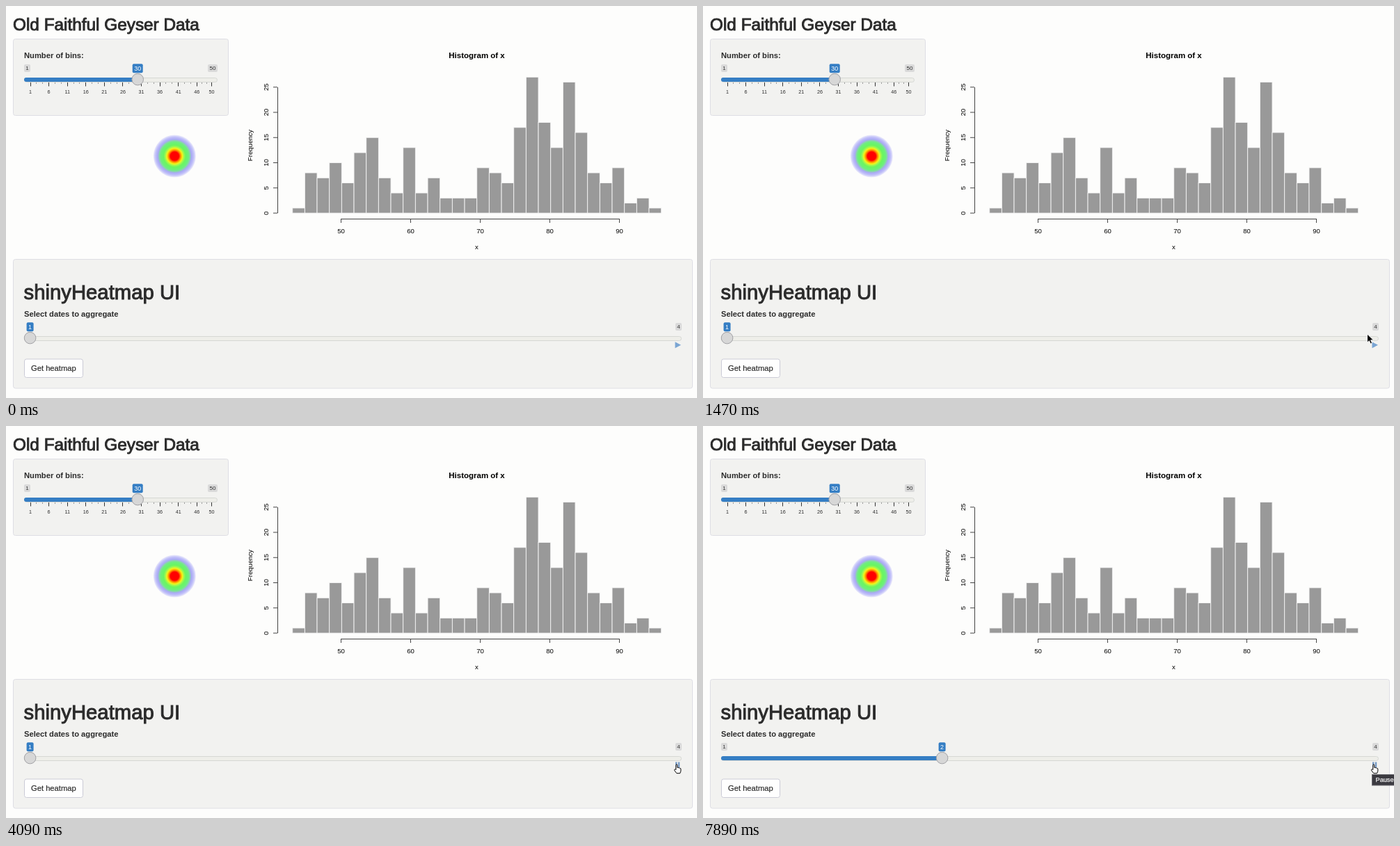
These frames come from a looping animation (993x564 px, 8000 ms). An HTML page:

```html
<!DOCTYPE html>
<html lang="en">
<head>
<meta charset="utf-8">
<title>Heatmap demo</title>
<style>
  html, body { margin: 0; width: 100%; height: 100%; overflow: hidden; background: #fdfdfc; }
  svg { display: block; width: 993px; height: 564px; font-family: "Liberation Sans", Arial, sans-serif; fill: #2b2b2b; }
  .well { fill: #f2f2f0; stroke: #dedee4; }
  .medium { stroke: #2b2b2b; stroke-width: .95; }
  .bold { font-weight: bold; font-size: 11.2px; }
  .mid { text-anchor: middle; }
  .track { fill: #eeeee9; stroke: #d6d8d4; }
  .blue { fill: #357ec4; }
  .knob { fill: #d7d7d7; stroke: #a0a0a4; }
  .tag { fill: #dadada; }
  .plot text { font-size: 9.6px; fill: #000; }
  .plot path { fill: none; stroke: #444; }
  .plot rect { fill: #999; stroke: #f4f4f4; stroke-width: .9; }
</style>
</head>
<body>
<svg viewBox="0 0 993 564">
  <defs>
    <radialGradient id="heat">
      <stop offset=".2" stop-color="#f00"/>
      <stop offset=".25" stop-color="#ff5a00"/>
      <stop offset=".31" stop-color="#ffb400"/>
      <stop offset=".37" stop-color="#f2f51c"/>
      <stop offset=".44" stop-color="#a0f850"/>
      <stop offset=".52" stop-color="#6af560"/>
      <stop offset=".66" stop-color="#6cf07c"/>
      <stop offset=".74" stop-color="#90cdb8"/>
      <stop offset=".79" stop-color="#a9a9f5"/>
      <stop offset=".9" stop-color="#c2c1f9"/>
      <stop offset="1" stop-color="#ededfb"/>
    </radialGradient>
  </defs>

  <text class="medium" x="10" y="35" font-size="24.35">Old Faithful Geyser Data</text>
  <rect class="well" x="10.5" y="47.5" width="309" height="110" rx="3"/>
  <text class="bold" x="26" y="75">Number of bins:</text>
  <g id="bins"></g>
  <circle cx="242.3" cy="216" r="30.5" fill="url(#heat)"/>
  <g id="plot" class="plot"></g>

  <rect class="well" x="10.5" y="364.5" width="976" height="185.5" rx="3"/>
  <text class="medium" x="25.5" y="422" font-size="29.3">shinyHeatmap UI</text>
  <text class="bold" x="26" y="447">Select dates to aggregate</text>
  <g id="dates"></g>
  <path id="play" d="M961.5 483.3L970 487.8L961.5 492.3Z" fill="#7aa5d3"/>
  <path id="pause" d="M962 483.5h2.4v8h-2.4zM965.8 483.5h2.4v8h-2.4z" fill="#7599c4"/>
  <rect x="26.5" y="508" width="84" height="26.5" rx="3" fill="#fefefe" stroke="#cbcbd6"/>
  <text x="36" y="525" font-size="11.2" stroke="#2b2b2b" stroke-width=".2">Get heatmap</text>

  <g id="tooltip">
    <rect x="961.5" y="501.5" width="40" height="15.5" fill="#3b3a40" stroke="#6a6a70"/>
    <text x="966.5" y="512" font-size="9.2" fill="#f4f4f4" stroke="#f4f4f4" stroke-width=".25">Pause</text>
  </g>
  <path id="arrow" d="M0 0V12.2L2.8 9.6L4.8 14L7 13L5.1 8.8H9Z" fill="#000" stroke="#fff" stroke-width=".9"/>
  <path id="hand" transform="translate(959.8 486.5)" fill="#fff" stroke="#000" stroke-linejoin="round"
    d="M3 8V1.6Q3 .5 4 .5T5 1.6V5Q6.2 4.2 7 5.4Q8.2 4.8 8.7 6Q10 5.6 10 7.2V10L8.8 13.2H4L.8 9Q.3 7.5 1.6 7.3Z"/>
</svg>
<script>
const DURATION = 8000, CLICK = 3700, STEP = 7290, TOOLTIP = 7590;
const $ = id => document.getElementById(id);
const text = (x, y, label, attrs = '') => `<text x="${x}" y="${y}" ${attrs}>${label}</text>`;

// Label in a rounded box centred on x
function tag(x, y, label, style, width, height, size) {
  return `<rect class="${style}" x="${x - width / 2}" y="${y - height / 2}" width="${width}" height="${height}" rx="2"/>`
    + text(x, y + size * .36, label, `class="mid" font-size="${size}" fill="${style === 'blue' ? '#fff' : '#333'}"`);
}

function slider({ left, right, y, knob, value, min, max }) {
  const narrow = 9, wide = 14;
  const width = label => String(label).length > 1 ? wide : narrow;
  return `<rect class="track" x="${left + .5}" y="${y - 2.5}" width="${right - left - 1}" height="6" rx="3"/>`
    + (value > min ? `<rect class="blue" x="${left}" y="${y - 3}" width="${knob - left}" height="6" rx="3"/>`
      + tag(left + narrow / 2, y - 16.5, min, 'tag', narrow, 11, 8) : '')
    + tag(right - width(max) / 2, y - 16.5, max, 'tag', width(max), 11, 8)
    + `<circle class="knob" cx="${knob}" cy="${y - .4}" r="8.3"/>`
    + tag(knob, y - 16.3, value, 'blue', value > 9 ? 15 : 10, 13, 9);
}

function binGrid() {
  const x = value => 35 + (value - 1) * 260.5 / 49;
  const crisp = value => Math.floor(x(value)) + .5;
  const stops = [...Array(10).keys()].map(i => 1 + i * 5).concat(50);
  let big = '', small = '', labels = '';
  stops.forEach((value, i) => {
    big += `M${crisp(value)} 109v6.5`;
    labels += text(x(value), 126, value, 'class="mid" font-size="7.2"');
    const gap = stops[i + 1] - value;
    if (gap) for (const k of [1, 2]) small += `M${crisp(value + gap * k / 3)} 109v3`;
  });
  return `<path d="${big}" stroke="#333"/><path d="${small}" stroke="#999"/>` + labels;
}

function histogram() {
  const counts = [1, 8, 7, 10, 6, 12, 15, 7, 4, 13, 4, 7, 3, 3, 3, 9, 8, 6, 17, 27, 18, 13, 26, 16, 8, 6, 9, 2, 3, 1];
  const width = 530 / counts.length, unit = 7.25, base = 298;
  let out = counts.map((n, i) =>
    `<rect x="${411.7 + i * width}" y="${base - n * unit}" width="${width}" height="${n * unit}"/>`).join('');
  let axes = 'M481.5 306.5H881.5M390.5 117V298';
  for (let v = 50; v <= 90; v += 10) {
    const x = v * 10 - 18.5;
    axes += `M${x} 306v6`;
    out += text(x, 327, v, 'class="mid"');
  }
  const sideways = (x, y, label) => text(0, 0, label, `class="mid" transform="translate(${x} ${y}) rotate(-90)"`);
  for (let v = 0; v <= 25; v += 5) {
    const y = base - v * unit;
    axes += `M390 ${y}h-6`;
    out += sideways(377, y, v);
  }
  return out + `<path d="${axes}"/>` + sideways(354, 200.5, 'Frequency') + text(676.5, 350, 'x', 'class="mid"')
    + text(676.5, 75, 'Histogram of x', 'class="mid" style="font-weight:bold;font-size:11.5px"');
}

// Pointer stops: time, x, y
const path = [[660, 679, 568], [770, 723.5, 553], [1100, 864, 505], [1320, 950, 474], [1470, 954.5, 472],
  [1700, 954.5, 472], [2000, 954.5, 485], [2270, 954.5, 485], [2650, 963, 487]];

function pointer(t) {
  const i = path.findIndex(stop => stop[0] > t);
  if (i < 1) return i ? path[path.length - 1].slice(1) : [-50, -50];
  const [t0, x0, y0] = path[i - 1], [t1, x1, y1] = path[i];
  const p = (t - t0) / (t1 - t0);
  return [x0 + (x1 - x0) * p, y0 + (y1 - y0) * p];
}

const show = (id, visible) => $(id).setAttribute('visibility', visible ? 'visible' : 'hidden');
let shownDate = 0;

function draw(t) {
  const date = t < STEP ? 1 : 2;
  if (date !== shownDate) {
    shownDate = date;
    $('dates').innerHTML = slider({ left: 26, right: 971, y: 478, knob: 34.6 + (date - 1) * 309, value: date, min: 1, max: 4 });
  }
  const [x, y] = pointer(t), hovering = x > 960.5;
  $('arrow').setAttribute('transform', `translate(${x} ${y})`);
  show('arrow', !hovering);
  show('hand', hovering);
  show('play', t < CLICK);
  show('pause', t >= CLICK);
  show('tooltip', t >= TOOLTIP);
}

$('bins').innerHTML = binGrid() + slider({ left: 26, right: 304, y: 106, knob: 189.2, value: 30, min: 1, max: 50 });
$('plot').innerHTML = histogram();

const start = performance.now();
function tick() {
  draw((performance.now() - start) % DURATION);
  requestAnimationFrame(tick);
}
tick();
</script>
</body>
</html>
```
